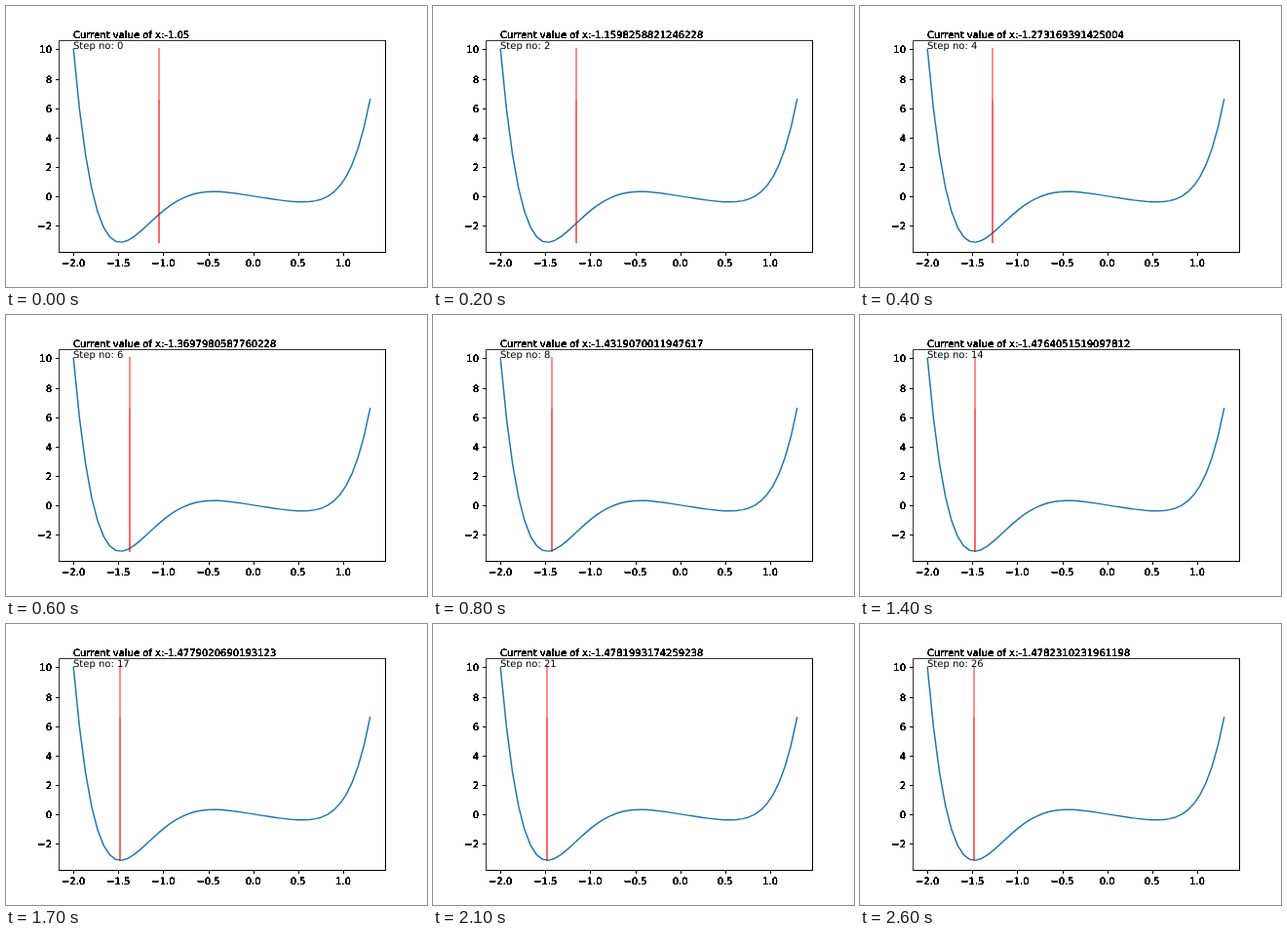
An HTML page for the animation above (2700 ms loop, 432 px wide and 288 px high).

```html
<!DOCTYPE html>
<html lang="en">
<head>
<meta charset="utf-8">
<title>Gradient descent</title>
<style>
  html, body { margin: 0; width: 100%; height: 100%; overflow: hidden; background: #fff; }
  svg { display: block; width: 432px; height: 288px; }
  text { font: 10px "DejaVu Sans", sans-serif; text-rendering: geometricPrecision; white-space: pre; }
</style>
</head>
<body>
<svg viewBox="0 0 432 288" xmlns="http://www.w3.org/2000/svg">
  <defs>
    <!-- Turns soft edges into solid pixels -->
    <filter id="hard" filterUnits="userSpaceOnUse" x="0" y="0" width="432" height="288">
      <feComponentTransfer><feFuncA type="linear" slope="12" intercept="-1.5"/></feComponentTransfer>
    </filter>
  </defs>
  <path id="curve" fill="none" stroke="#1f77b4" stroke-width="1.5" stroke-linejoin="round" stroke-linecap="square"/>
  <g id="marker" fill="#f00">
    <rect id="upper" x="-1" width="2" fill-opacity=".45"/>
    <rect id="lower" x="-1" width="2" fill-opacity=".6"/>
  </g>
  <path d="M54.5 252.5V35.5H389.5" fill="none" stroke="#333"/>
  <text id="step" x="69" y="44"></text>
  <g filter="url(#hard)">
    <path d="M54.5 252.5H389.5V35.5" fill="none" stroke="#000" stroke-width=".8" stroke-linecap="square"/>
    <g id="axes" stroke-width=".8"></g>
    <text id="value" x="69" y="33"></text>
  </g>
</svg>
<script>
const $ = id => document.getElementById(id);
const STEPS = 27, STEP_MS = 100, RATE = 0.01, START = -1.05;

const f = x => x ** 6 + x ** 5 - x ** 4 + x ** 3 - x;
const slope = x => 6 * x ** 5 + 5 * x ** 4 - 4 * x ** 3 + 3 * x ** 2 - 1;

const xs = Array.from({ length: 50 }, (_, i) => -2 + 3.3 * i / 49);
const ys = xs.map(f);
const yMin = Math.min(...ys), yMax = Math.max(...ys);

// Axes box with a 5% margin around the data
const px = x => 54 + 334.8 * (1 / 22 + (x + 2) / 3.3 / 1.1);
const py = y => 252 - 217.44 * (1 / 22 + (y - yMin) / (yMax - yMin) / 1.1);

function add(tag, attrs, text = '') {
  const el = document.createElementNS('http://www.w3.org/2000/svg', tag);
  for (const key in attrs) el.setAttribute(key, attrs[key]);
  el.textContent = text;
  $('axes').append(el);
}

function tick(d, x, y, anchor, label) {
  add('path', { d, stroke: '#000' });
  add('text', { x, y, 'text-anchor': anchor }, label.replace('-', '\u2212'));
}

for (let v = -2; v <= 1; v += 0.5) {
  tick(`M${Math.round(px(v)) + 0.5} 252.5v3.5`, px(v), 267, 'middle', v.toFixed(1));
}
for (let v = -2; v <= 10; v += 2) {
  const y = Math.round(py(v));
  tick(`M54.5 ${y + 0.5}h-3.5`, 47, y + 4, 'end', String(v));
}

$('curve').setAttribute('d', 'M' + xs.map((x, i) => `${px(x).toFixed(2)} ${py(ys[i]).toFixed(2)}`).join('L'));

// The marker is denser below the right end of the curve
function span(id, top, bottom) {
  $(id).setAttribute('y', top);
  $(id).setAttribute('height', bottom - top);
}
const bend = Math.round(py(ys[49]));
span('upper', Math.round(py(yMax)) - 1, bend);
span('lower', bend, Math.round(py(yMin)) + 1);

const path = [START];
while (path.length < STEPS) {
  const x = path[path.length - 1];
  path.push(x - RATE * slope(x));
}

let shown = -1;
function draw(now) {
  const n = Math.floor(now / STEP_MS) % STEPS;
  if (n !== shown) {
    shown = n;
    $('marker').setAttribute('transform', `translate(${Math.round(px(path[n]))})`);
    $('value').textContent = 'Current value of x:' + path[n];
    $('step').textContent = 'Step no: ' + n;
  }
  requestAnimationFrame(draw);
}
draw(performance.now());
</script>
</body>
</html>
```
